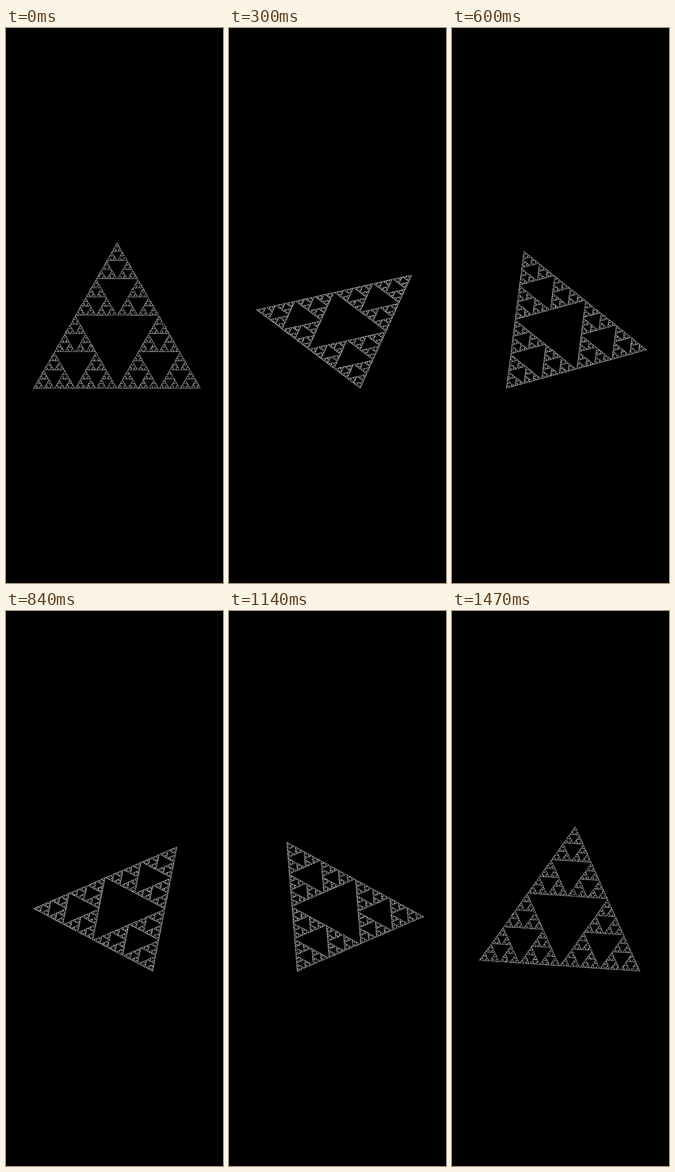
Recreate the animation shown at these times as an HTML page with a canvas. Size 469 by 1194 pixels, loop 1.5 s.

```html
<!DOCTYPE html>
<html lang="en">
<head>
<meta charset="utf-8">
<title>Rotating chaos game</title>
<style>
  html, body { margin: 0; width: 100%; height: 100%; overflow: hidden; background: #000; }
  canvas { display: block; }
</style>
</head>
<body>
<canvas id="stage" width="469" height="1194"></canvas>
<script>
const ctx = document.getElementById('stage').getContext('2d');
const W = 469, H = 1194;
const STEPS = 50, STEP_MS = 30, POINTS = 32000;
const CENTER = { x: 240.2, y: 670.8 }, RADIUS = 209.3;
const HALF = RADIUS * Math.sqrt(3) / 2;
const BOX = {
  left: CENTER.x - HALF, right: CENTER.x + HALF,
  top: CENTER.y - RADIUS, bottom: CENTER.y + RADIUS / 2
};

// Dots are half a pixel wide: up to four of them light one pixel
const cells = new Uint8Array(W * 2 * H * 2);
const image = ctx.createImageData(W, H);
const pixels = new Uint32Array(image.data.buffer);
const BLACK = 0xff000000, QUARTER_GREY = 0x3f3f3f;

const clamp = (v, lo, hi) => Math.min(hi, Math.max(lo, v));
const mix = (a, b, t) => a + (b - a) * t;

function makeRandom(seed) {
  let s = seed;
  return () => {
    s = (s + 0x6d2b79f5) | 0;
    let t = Math.imul(s ^ (s >>> 15), 1 | s);
    t = (t + Math.imul(t ^ (t >>> 7), 61 | t)) ^ t;
    return ((t ^ (t >>> 14)) >>> 0) / 4294967296;
  };
}

// Corners travel on a circle that is cut off by the box
function corner(step, i) {
  const a = (i / 3 - step / STEPS) * 2 * Math.PI;
  return [
    clamp(CENTER.x + RADIUS * Math.sin(a), BOX.left, BOX.right),
    clamp(CENTER.y - RADIUS * Math.cos(a), BOX.top, BOX.bottom)
  ];
}

function plot(x, y) {
  const cx = Math.floor(x * 2), cy = Math.floor(y * 2);
  const cell = cy * W * 2 + cx;
  if (cells[cell]) return;
  cells[cell] = 1;
  pixels[(cy >> 1) * W + (cx >> 1)] += QUARTER_GREY;
}

function draw(step) {
  const random = makeRandom(step * 7919 + 17);
  const corners = [0, 1, 2].map(i => corner(step, i));
  let x = mix(BOX.left, BOX.right, random());
  let y = mix(BOX.top, BOX.bottom, random());
  cells.fill(0);
  pixels.fill(BLACK);
  for (let n = 0; n < POINTS; n++) {
    plot(x, y);
    const c = corners[Math.floor(random() * 3)];
    x = (x + c[0]) / 2;
    y = (y + c[1]) / 2;
  }
  ctx.putImageData(image, 0, 0);
}

let shown = -1;
const begin = performance.now();

function tick(now) {
  const step = Math.floor(Math.max(0, now - begin) / STEP_MS) % STEPS;
  if (step !== shown) draw(shown = step);
  requestAnimationFrame(tick);
}
tick(begin);
</script>
</body>
</html>
```
